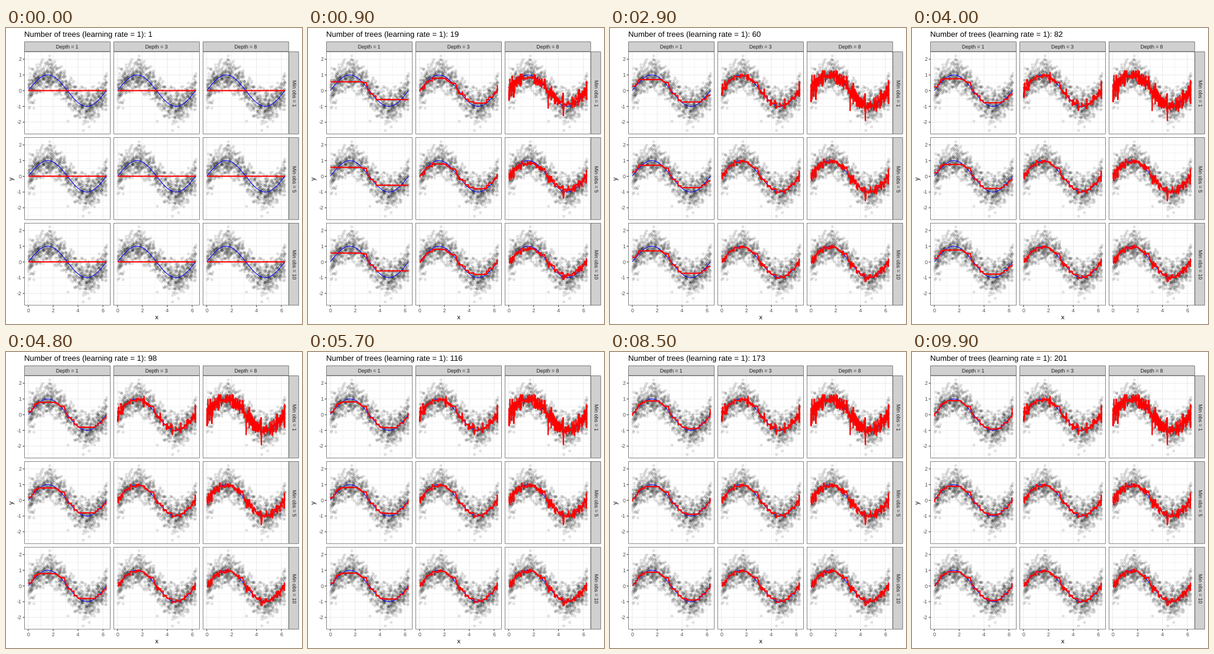
A matplotlib script for the animation above (10000 ms loop, 504 by 504 pixels).

```python
import numpy as np
import matplotlib.pyplot as plt
from matplotlib.animation import FuncAnimation
from matplotlib.patches import Rectangle

plt.rcParams.update({
    "font.family": "Liberation Sans",
    "text.hinting": "none",
    "path.snap": False,
    "lines.solid_capstyle": "butt",
})

SIZE, FRAMES, TREES = 504, 100, 200
RATE, COMPLEXITY = 0.1, 0.001
DEPTHS, MIN_OBS = (1, 3, 8), (1, 5, 10)

# Panel geometry in pixels, y pointing down
LEFT, TOP, WIDTH, HEIGHT, GAP = 31.3, 40.3, 146.4, 140.33, 5.5
STRIP = 17
RIGHT = LEFT + 3 * WIDTH + 2 * GAP
BOTTOM = TOP + 3 * HEIGHT + 2 * GAP
X_MIN, X_MAX = -0.05 * 2 * np.pi, 1.05 * 2 * np.pi
Y_MIN, Y_MAX = -2.76, 2.48


def make_data():
    rng = np.random.default_rng(12)
    x = rng.uniform(0, 2 * np.pi, 1000)
    noise = rng.normal(0, 0.5, x.size)
    keep = np.abs(noise) < 1.2
    x, y = x[keep], (np.sin(x) + noise)[keep]
    outliers = np.array([
        (1.70, 2.24), (1.14, 2.0), (1.68, 1.97), (4.40, -2.52), (4.87, -2.3),
        (3.17, -1.9), (0.41, -1.1), (0.40, -0.75), (0.02, -0.6),
        (0.03, -1.1), (0.10, 1.45), (6.24, 0.95), (6.25, 0.5), (6.265, 1.1),
        (6.28, 0.5),
    ])
    x, y = np.append(x, outliers[:, 0]), np.append(y, outliers[:, 1])
    order = np.argsort(x)
    return x[order], y[order]


def grow(sums, lo, hi, depth, min_obs, penalty):
    """Regression tree on lo..hi, pruned by cost; returns (value, cuts)."""
    n = hi - lo
    if depth == 0 or n < 3 * min_obs:
        return 0, []
    k = np.arange(min_obs, n - min_obs + 1 if min_obs > 1 else n)
    total = sums[hi] - sums[lo]
    part = sums[lo + k] - sums[lo]
    gain = part**2 / k + (total - part)**2 / (n - k) - total**2 / n
    i = gain.argmax()
    cut = int(lo + k[i])
    left, left_cuts = grow(sums, lo, cut, depth - 1, min_obs, penalty)
    right, right_cuts = grow(sums, cut, hi, depth - 1, min_obs, penalty)
    value = gain[i] - penalty + left + right
    return (value, left_cuts + [cut] + right_cuts) if value > 0 else (0, [])


def boost(y, depth, min_obs):
    """Gradient boosting on sorted data; the fit after 0..TREES trees."""
    fit = np.full(y.size, y.mean())
    stages = [fit]
    for _ in range(TREES):
        resid = y - fit
        sums = np.append(0, np.cumsum(resid))
        penalty = COMPLEXITY * (resid**2).sum()
        cuts = grow(sums, 0, y.size, depth, min_obs, penalty)[1]
        edges = np.array([0, *cuts, y.size])
        sizes = np.diff(edges)
        fit = fit + RATE * np.repeat(np.diff(sums[edges]) / sizes, sizes)
        stages.append(fit)
    return stages


def px(x, col):
    return LEFT + col * (WIDTH + GAP) + (x - X_MIN) / (X_MAX - X_MIN) * WIDTH


def py(y, row):
    return TOP + row * (HEIGHT + GAP) + (Y_MAX - y) / (Y_MAX - Y_MIN) * HEIGHT


fig = plt.figure(figsize=(SIZE / 72, SIZE / 72), dpi=72, facecolor="white")
ax = fig.add_axes([0, 0, 1, 1])
ax.set(xlim=(0, SIZE), ylim=(SIZE, 0))
ax.axis("off")


def segment(x0, y0, x1, y1, color, width):
    ax.plot([x0, x1], [y0, y1], color=color, lw=width, zorder=1)


def label(x, y, text, size=8.8, color="#1a1a1a", ha="center", angle=0):
    return ax.text(x, y, text, size=size, color=color, ha=ha, va="baseline",
                   rotation=angle, rotation_mode="anchor", zorder=6)


def box(x, y, w, h, fill="none"):
    # Borders are clipped at the cell, so only their inner half shows
    d = 0.27
    ax.add_patch(Rectangle((x + d, y + d), w - 2 * d, h - 2 * d, fc=fill,
                           ec="#333333", lw=0.6, zorder=5))


def draw_panel(row, col):
    x0, y0 = LEFT + col * (WIDTH + GAP), TOP + row * (HEIGHT + GAP)
    x1, y1 = x0 + WIDTH, y0 + HEIGHT
    grid = "#ebebeb"
    for v in (1, 3, 5):
        segment(px(v, col), y0, px(v, col), y1, grid, 0.53)
    for v in (-2.5, -1.5, -0.5, 0.5, 1.5):
        segment(x0, py(v, row), x1, py(v, row), grid, 0.53)
    for v in (0, 2, 4, 6):
        segment(px(v, col), y0, px(v, col), y1, grid, 1.07)
    for v in range(-2, 3):
        segment(x0, py(v, row), x1, py(v, row), grid, 1.07)
    ax.plot(px(xs, col), py(np.sin(xs), row), color="blue", lw=1.07, zorder=3)
    box(x0, y0, WIDTH, HEIGHT)


def draw_axes():
    dark, grey, strip = "#333333", "#4d4d4d", "#d0d0d0"
    for i in range(3):
        x0, y0 = LEFT + i * (WIDTH + GAP), TOP + i * (HEIGHT + GAP)
        box(x0, TOP - STRIP, WIDTH, STRIP, strip)
        label(x0 + WIDTH / 2, TOP - STRIP / 2 + 3.15, f"Depth = {DEPTHS[i]}")
        box(RIGHT, y0, STRIP, HEIGHT, strip)
        label(RIGHT + STRIP / 2 - 3.15, y0 + HEIGHT / 2,
              f"Min obs = {MIN_OBS[i]}", angle=270)
        for v in (0, 2, 4, 6):
            segment(px(v, i), BOTTOM, px(v, i), BOTTOM + 2.75, dark, 1.07)
            label(px(v, i), BOTTOM + 11.3, str(v), color=grey)
        for v in range(-2, 3):
            segment(LEFT - 2.75, py(v, i), LEFT, py(v, i), dark, 1.07)
            label(LEFT - 4.95, py(v, i) + 3.15, str(v), color=grey, ha="right")
    label((LEFT + RIGHT) / 2, 496.5, "x", 11, "black")
    label(13.4, (TOP + BOTTOM) / 2, "y", 11, "black", angle=90)


xs, ys = make_data()
cells = [(r, c) for r in range(3) for c in range(3)]
for r, c in cells:
    draw_panel(r, c)
draw_axes()
ax.scatter(np.concatenate([px(xs, c) for r, c in cells]),
           np.concatenate([py(ys, r) for r, c in cells]),
           s=15.2, c="black", alpha=0.1, linewidths=0.71,
           edgecolors="black", zorder=2)

fits = [boost(ys, DEPTHS[c], MIN_OBS[r]) for r, c in cells]
lines = [ax.plot(px(xs, c), py(0 * xs, r), color="red", lw=2.13, zorder=4,
                 solid_joinstyle="round")[0] for r, c in cells]
title = label(LEFT - 0.3, 15, "", 13.2, "black", ha="left")


def update(frame):
    trees = round(TREES * frame / (FRAMES - 1))
    title.set_text(f"Number of trees (learning rate = 1): {trees + 1}")
    for line, stages, (r, _) in zip(lines, fits, cells):
        line.set_ydata(py(stages[trees], r))
    return [title, *lines]


anim = FuncAnimation(fig, update, frames=FRAMES, interval=100, repeat=True,
                     repeat_delay=0)
plt.show()
```
